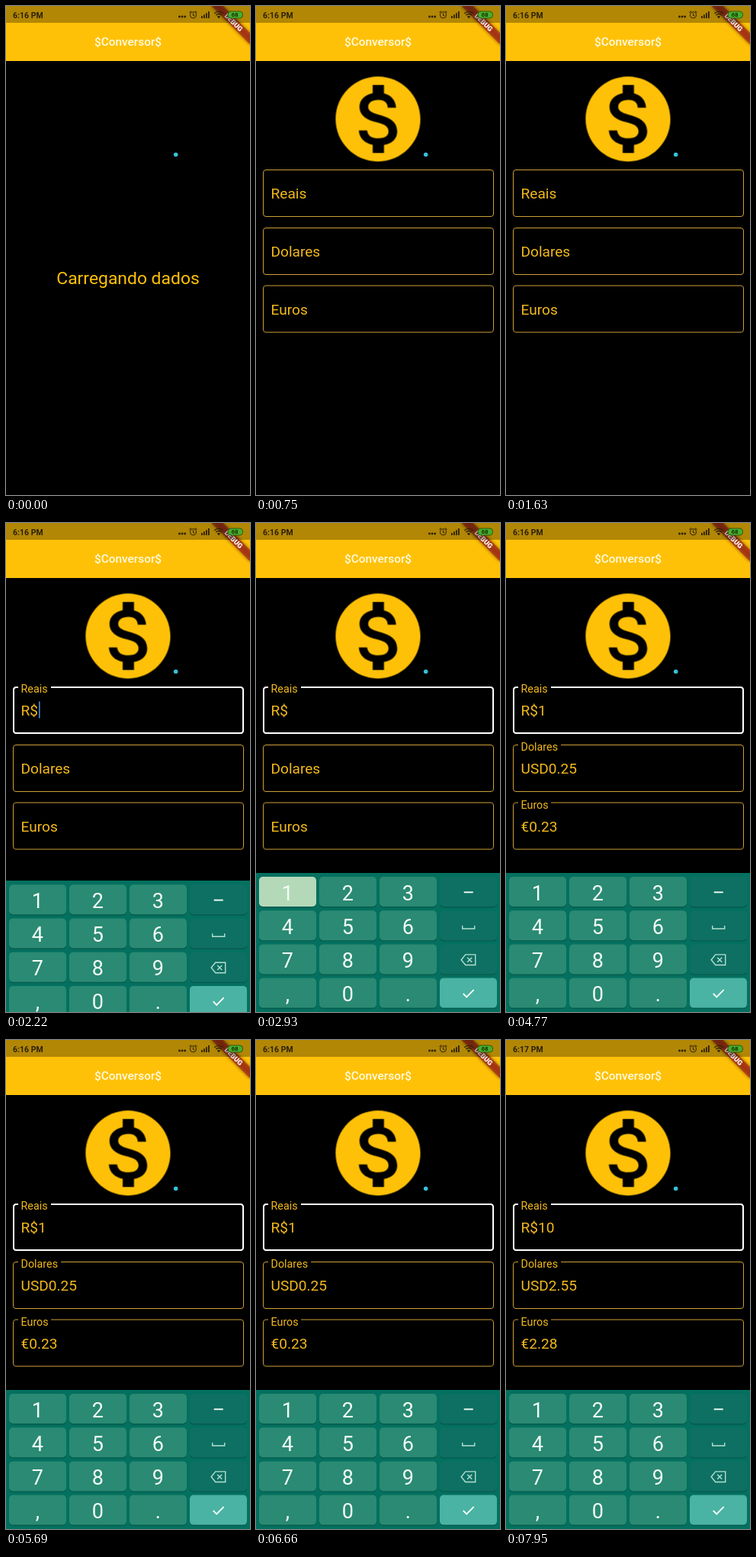
Animation, 320 px wide and 640 px high, one loop 8 s. Source, as an HTML page:

```html
<!DOCTYPE html>
<html lang="pt">
<head>
<meta charset="utf-8">
<title>Conversor</title>
<style>
html, body { margin: 0; width: 100%; height: 100%; overflow: hidden; background: #000; }
svg { display: block; width: 320px; height: 640px; font-family: Roboto, sans-serif; }
.amber { fill: #ffc107; }
.entry { font-size: 19.1px; fill: #f2b91c; }
.border { fill: none; stroke: #cf9f38; stroke-width: 1; }
.focus { stroke: #fff; stroke-width: 2; }
.digit { font-size: 27px; text-anchor: middle; fill: #f3fcf6; }
.icon { fill: none; stroke: #b4dfd2; stroke-width: 1.4; }
.bright { stroke: #f3fcf6; stroke-width: 1.9; }
.cursor { fill: #4b86d8; }

/* Hard switches: 1% = 80 ms */
.loading, .form, .focus, .first, .second, .before, .after, .press1, .press0, .empty {
  animation: 8s step-end infinite;
}
.loading { animation-name: loading; }
.form { animation-name: form; }
.focus { animation-name: focus; }
.empty { animation-name: empty; }
.first { animation-name: first; }
.second { animation-name: second; }
.before { animation-name: before; }
.after { animation-name: after; }
.press1 { animation-name: press1; }
.press0 { animation-name: press0; }
@keyframes loading { 0% { opacity: 1 } 6%, 100% { opacity: 0 } }
@keyframes form { 0% { opacity: 0 } 6%, 100% { opacity: 1 } }
@keyframes focus { 0% { opacity: 0 } 24%, 100% { opacity: 1 } }
@keyframes empty { 0% { opacity: 0 } 25% { opacity: 1 } 37.75%, 100% { opacity: 0 } }
@keyframes first { 0% { opacity: 0 } 37.75% { opacity: 1 } 90%, 100% { opacity: 0 } }
@keyframes second { 0% { opacity: 0 } 90%, 100% { opacity: 1 } }
@keyframes before { 0% { opacity: 1 } 91.25%, 100% { opacity: 0 } }
@keyframes after { 0% { opacity: 0 } 91.25%, 100% { opacity: 1 } }
@keyframes press1 { 0% { opacity: 0 } 35.75% { opacity: 1 } 37.5%, 100% { opacity: 0 } }
@keyframes press0 { 0% { opacity: 0 } 88.5% { opacity: 1 } 90%, 100% { opacity: 0 } }

.cursor { animation: blink 1s step-end infinite; }
.first .cursor { animation-delay: -980ms; }
.second .cursor { animation-delay: -800ms; }
@keyframes blink { 0% { opacity: 1 } 50%, 100% { opacity: 0 } }

.label, .gap { animation: 8s cubic-bezier(.4, 0, .2, 1) infinite; }
.gap { transform-origin: 16px 0; }
.early .label { animation-name: floatEarly; }
.late .label { animation-name: floatLate; }
.early .gap { animation-name: gapEarly; }
.late .gap { animation-name: gapLate; }
@keyframes floatEarly {
  0%, 24% { transform: translate(19.5px, 38px) }
  26.1%, 100% { transform: translate(19.5px, 8.4px) scale(.75) }
}
@keyframes floatLate {
  0%, 37.75% { transform: translate(19.5px, 38px) }
  39.85%, 100% { transform: translate(19.5px, 8.4px) scale(.75) }
}
@keyframes gapEarly { 0%, 24% { transform: scaleX(0) } 26.1%, 100% { transform: none } }
@keyframes gapLate { 0%, 37.75% { transform: scaleX(0) } 39.85%, 100% { transform: none } }

.prefix { animation: prefix 8s linear infinite; }
@keyframes prefix { 0%, 24% { opacity: 0 } 26.1%, 100% { opacity: 1 } }

.keyboard { animation: slide 8s cubic-bezier(.33, .67, .67, 1) infinite; }
@keyframes slide { 0%, 25% { transform: translateY(182px) } 28.625%, 100% { transform: none } }
</style>
</head>
<body>
<svg viewBox="0 0 320 640">
  <defs><filter id="soft" x="-20%" y="-100%" width="140%" height="300%"><feGaussianBlur stdDeviation="2.2"/></filter></defs>
  <rect width="320" height="640"/>

  <text class="loading amber" x="160" y="364.4" font-size="22.9" text-anchor="middle">Carregando dados</text>

  <g class="form">
    <path class="amber" transform="translate(93.3 81.2) scale(5.56)" d="M12 2C6.48 2 2 6.48 2 12s4.48 10 10 10 10-4.48 10-10S17.52 2 12 2zm1.41 16.09V20h-2.67v-1.93c-1.71-.36-3.16-1.46-3.27-3.4h1.96c.1 1.05.82 1.87 2.65 1.87 1.96 0 2.4-.98 2.4-1.59 0-.83-.44-1.61-2.67-2.14-2.48-.6-4.18-1.62-4.18-3.67 0-1.72 1.39-2.84 3.11-3.21V4h2.67v1.95c1.86.45 2.79 1.86 2.85 3.39H14.3c-.05-1.11-.64-1.87-2.22-1.87-1.5 0-2.4.68-2.4 1.64 0 .84.65 1.39 2.67 1.91s4.18 1.39 4.18 3.91c-.01 1.83-1.38 2.83-3.12 3.16z"/>
    <g id="fields"></g>
  </g>

  <circle cx="222.7" cy="194.5" r="2.8" fill="#35c3d8"/>
  <g class="keyboard" id="keyboard"><rect y="458" width="320" height="184" fill="#04705f"/></g>

  <rect class="amber" width="320" height="72"/>
  <text x="160" y="52.4" font-size="15.4" font-weight="500" text-anchor="middle" fill="#fffbe2">$Conversor$</text>

  <g transform="translate(320) rotate(45)">
    <rect x="-36" y="24.9" width="72" height="10.7" opacity=".5" filter="url(#soft)"/>
    <rect x="-36" y="24.9" width="72" height="10.7" fill="#b71c1c" fill-opacity=".63"/>
    <text y="33.5" font-size="9.1" font-weight="900" text-anchor="middle" fill="#fff">DEBUG</text>
  </g>

  <rect width="320" height="22" opacity=".3"/>
  <g fill="#2c2106">
    <g font-size="10.5" font-weight="700">
      <text class="before" x="9" y="15.5">6:16 PM</text>
      <text class="after" x="9" y="15.5">6:17 PM</text>
    </g>
    <circle cx="227.5" cy="14" r="1.4"/><circle cx="231.1" cy="14" r="1.4"/><circle cx="234.7" cy="14" r="1.4"/>
    <g fill="none" stroke="#3a2b06" stroke-width="1.1">
      <circle cx="245.5" cy="11.8" r="4"/>
      <path d="M245.5 9.3v2.8l1.8 1M240.6 8.6l2.3-2M250.4 8.6l-2.3-2"/>
    </g>
    <path d="M256 13h1.8v3H256zM259 11.3h1.8V16H259zM262 9.2h1.8V16H262zM265 7h1.8v9H265z"/>
    <g fill="none" stroke="#2c2106" stroke-width="1.4">
      <path d="M273.2 9.8q5.8-4.8 11.6 0M275.2 12q3.8-3 7.6 0"/>
    </g>
    <path d="M276.8 13.8q2.2-1.6 4.4 0L279 16.2z"/>
    <rect x="291" y="7" width="19.5" height="9" rx="4" fill="#47ad2c" stroke="#26480f" stroke-width=".8"/>
    <text x="300" y="14.4" font-size="8" font-weight="700" text-anchor="middle" fill="#173407">68</text>
  </g>
</svg>
<script>
const add = (id, markup) => document.getElementById(id).insertAdjacentHTML('beforeend', markup);

const outline = (kind, inset) =>
  `<rect class="${kind}" x="${9 + inset}" y="${inset}" width="${303 - 2 * inset}" height="${62 - 2 * inset}" rx="3.5"/>`;
const entry = (text, kind, x = 19.5) => `<text class="entry ${kind}" x="${x}" y="38">${text}</text>`;
const cursor = (kind, x) => `<g class="${kind}"><rect class="cursor" x="${x}" y="19.5" width="1.6" height="22"/></g>`;

function field(y, phase, name, gap, content) {
  const focused = phase === 'early' ? outline('border focus', 1) : '';
  add('fields', `<g class="${phase}" transform="translate(0 ${y})">${outline('border', .5)}${focused}
    <rect class="gap" x="16" y="-2" width="${gap}" height="5"/>
    <text class="label entry">${name}</text>${content}</g>`);
}

field(214, 'early', 'Reais', 43,
  entry('R$', 'prefix') + entry('1', 'first', 42) + entry('10', 'second', 42) +
  cursor('empty', 43) + cursor('first', 53.8) + cursor('second', 64.5));
field(290, 'late', 'Dolares', 56, entry('USD0.25', 'first') + entry('USD2.55', 'second'));
field(365.5, 'late', 'Euros', 43, entry('€0.23', 'first') + entry('€2.28', 'second'));

const icons = [
  '<path class="icon bright" d="M-6 0h12"/>',
  '<path class="icon" d="M-8-.5v4H8v-4"/>',
  '<path class="icon" d="M-9.5 0L-4-6.8H9V6.8H-4zM-1.5-3l6 6m0-6l-6 6"/>',
  '<path class="icon bright" d="M-7 0l4.5 4.6L7-5"/>'
];

['123', '456', '789', ',0.'].forEach((digits, row) => {
  const y = 463 + row * 44.2;
  const cap = (x, fill, kind = '') =>
    `<rect class="${kind}" x="${x}" y="${y}" width="75" height="39" rx="5" fill="${fill}"/>`;
  const shade = x => `<rect x="${x}" y="${y + 1.4}" width="75" height="39" rx="5" fill="#075a4c"/>`;

  [...digits].forEach((digit, column) => {
    const x = 4 + column * 79;
    const pressed = '10'.includes(digit) ? cap(x, '#b4d9b8', 'press' + digit) : '';
    add('keyboard', shade(x) + cap(x, '#2a8a73') + pressed +
      `<text class="digit" x="${x + 37.3}" y="${y + 30.6}">${digit}</text>`);
  });
  add('keyboard', shade(241) + cap(241, row === 3 ? '#4ab3a3' : '#0e7062') +
    `<g transform="translate(278.7 ${y + 20.3})">${icons[row]}</g>`);
});
</script>
</body>
</html>
```
